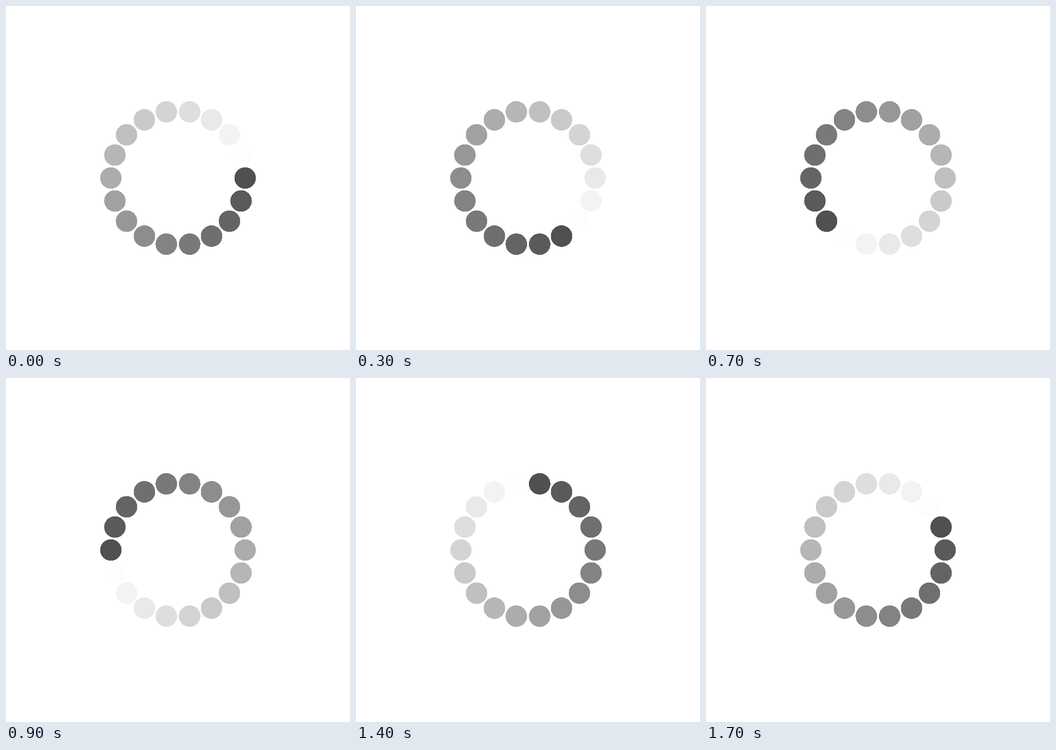
Recreate the animation shown at these times as an HTML page. Size 748 px wide and 748 px high, loop 1.8 s.

```html
<!DOCTYPE html>
<html lang="en">
<head>
<meta charset="utf-8">
<title>Loading ring</title>
<style>
  html, body { margin: 0; width: 100%; height: 100%; overflow: hidden; background: #fff; }
  svg { display: block; width: 100vw; height: 100vh; }
</style>
</head>
<body>
<svg id="stage" viewBox="0 0 748 748" shape-rendering="crispEdges"></svg>
<script>
  const COUNT = 18, STEP = 100, CENTER = 374, RING = 146, RADIUS = 23.4;
  const DARK = 80, LIGHT = 253;
  const stage = document.getElementById('stage');

  const dots = Array.from({ length: COUNT }, (_, i) => {
    const angle = i / COUNT * 2 * Math.PI;
    const dot = document.createElementNS('http://www.w3.org/2000/svg', 'circle');
    dot.setAttribute('cx', (CENTER + RING * Math.cos(angle)).toFixed(2));
    dot.setAttribute('cy', (CENTER + RING * Math.sin(angle)).toFixed(2));
    dot.setAttribute('r', RADIUS);
    return stage.appendChild(dot);
  });

  // The darkest dot leads; shades lighten clockwise from it.
  function draw(ms) {
    const lead = Math.floor(ms / STEP) % COUNT;
    dots.forEach((dot, i) => {
      const rank = (i - lead + COUNT) % COUNT;
      const v = Math.round(DARK + (LIGHT - DARK) * rank / (COUNT - 1));
      dot.setAttribute('fill', `rgb(${v},${v},${v})`);
    });
  }

  function tick() {
    draw(performance.now() - start);
    requestAnimationFrame(tick);
  }

  const start = performance.now();
  draw(0);
  requestAnimationFrame(tick);
</script>
</body>
</html>
```
